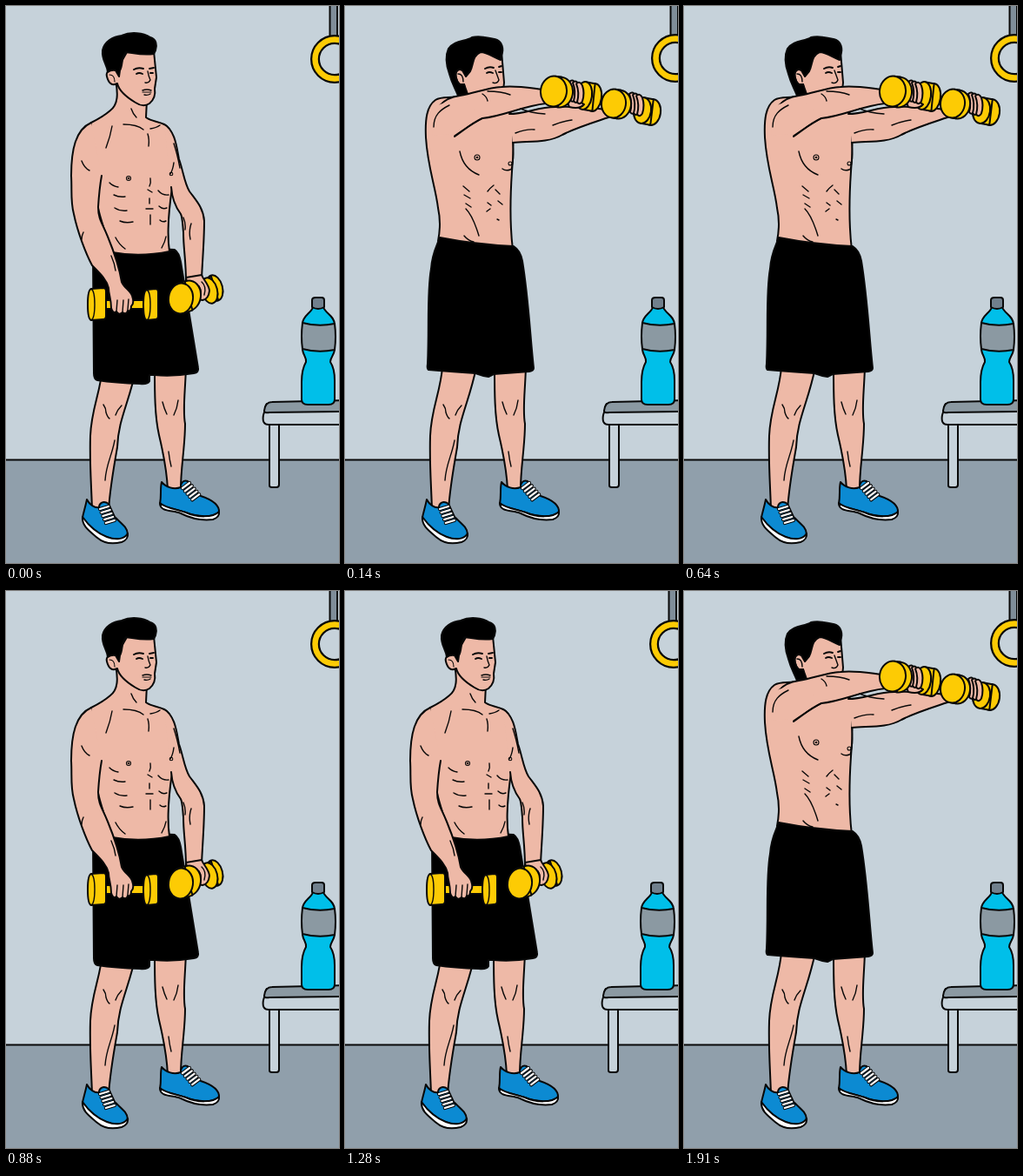
Recreate the animation shown at these times as an HTML page. Size 383x640 px, loop 2.05 s.

```html
<!DOCTYPE html>
<html lang="en">
<head>
<meta charset="utf-8">
<title>Dumbbell front raise</title>
<style>
html, body { margin: 0; height: 100%; overflow: hidden; background: #c6d2da; }
svg { display: block; width: 100vw; height: 100vh; stroke: #080808; stroke-width: 2; stroke-linejoin: round; stroke-linecap: round; }
.skin { fill: #eeb9a7; }
.ink { fill: #000; }
.blue { fill: #0c8ad2; }
.cyan { fill: #00bfe9; }
.gray { fill: #8b99a2; }
.pale { fill: #c6d2da; }
.gold { fill: #fdcb04; }
.white { fill: #fff; }
.line { fill: none; stroke-width: 1.4; }
.fine { fill: none; stroke-width: 1.1; }
</style>
</head>
<body>
<svg viewBox="0 0 383 640" preserveAspectRatio="none">
  <path fill="#c6d2da" stroke="none" d="M0 0H383V522H0z"/>
  <path fill="#909fab" stroke="none" d="M0 521H383V640H0z"/>
  <path d="M0 521.5H383"/>

  <g id="ring">
    <path fill="#7f8d99" d="M372.500 -3V36H381V-3z"/>
    <circle cx="378" cy="61" r="22.500" fill="none" stroke-width="11"/>
    <circle cx="378" cy="61" r="22.500" fill="none" stroke="#fdcb04" stroke-width="6.500"/>
  </g>

  <g id="room">
    <path class="pale" d="M303 480V551Q303 553 306 553H311Q314 553 314 550V480z"/>
    <path class="pale" d="M300 457L296 470Q294 481 302 481H392V457z"/>
    <path class="gray" d="M297 465Q298 455 306 455L392 453V466L303 467Q297 468 297 465z"/>
    <path class="cyan" d="M353 346C351 353 341 356 341 365V395C342 402 346 404 345 409C341 416 340 423 340 432V452Q340 458 347 458H371Q378 458 378 452V430C378 421 377 415 373 409C373 404 377 402 378 395V366C378 356 367 353 365 346z"/>
    <path class="gray" d="M341 364Q359 369 378 365Q380 380 378 395Q359 399 341 394Q339 380 341 364z"/>
    <path fill="#71808d" d="M352 338Q352 335 356 335H363Q366 335 366 338V346Q359 350 352 346z"/>

    <path class="skin" d="M111 415C109 443 98 463 97 494C96 525 98 547 99 578L118 580C119 560 123 535 128 507C129 475 142 455 150 415z"/>
    <path class="skin" d="M171 415C171 444 171 471 176 493C181 514 185 532 186 556L201 555C201 530 206 506 206 480C203 464 206 446 207 415z"/>
    <path class="line" d="M125 499C122 516 115 527 114 545M112 458Q115 462 115 467Q117 473 119 474M133 459Q128 464 126 470M180 455Q182 463 185 469M198 453Q197 462 193 470M187 512Q188 521 190 529"/>

    <path class="blue" d="M93 567C96 573 102 577 107 576C107 571 112 568 118 572L125 587C132 594 140 599 140 607C137 614 125 614 115 610C105 605 95 597 88 588C89 582 91 577 93 567z"/>
    <path class="white" d="M88 587C95 597 105 606 116 610C126 614 136 613 140 606Q141 613 133 616C121 619 112 617 105 611C97 604 87 598 88 587z"/>
    <path class="blue" d="M179 547C184 553 193 556 201 553C201 548 204 544 209 546C213 552 218 558 224 563C236 567 246 573 245 582C238 588 220 587 207 582C195 578 184 577 177 572C179 562 177 555 179 547z"/>
    <path class="white" d="M177 571C184 577 195 578 207 582C220 588 238 588 245 581Q246 587 238 590C222 592 211 588 201 583C192 579 177 582 177 571z"/>
    <g id="laces"></g>
  </g>

  <g id="low">
    <path class="ink" d="M100 285Q140 276 194 280Q199 283 201 294L221 416Q222 421 216 422Q192 426 171 424L165 424V431Q163 435 154 434Q126 433 105 430Q101 429 101 422z"/>
    <path class="skin" d="M126 85C129 101 129 113 120 120C112 127 104 131 98 134L88 180L105 228C110 252 118 270 122 283Q154 289 188 282C185 262 187 236 191 209L194 175C196 155 190 140 182 136C174 132 168 133 161 128L162 108z"/>
    <path class="skin" d="M182 136C194 143 196 160 199 176C204 190 205 203 211 213C219 224 227 232 228 247C228 270 226 290 225 314L207 318C207 290 204 280 204 260C203 250 203 243 201 239C195 231 191 222 190 208"/>
    <path class="line" d="M193 158Q197 170 200 186M193 180Q192 188 189 193M204 243Q207 250 206 257M213 250Q210 259 212 268"/>
    <path class="line" d="M135 136Q151 136 158 142M166 141Q173 140 177 137M163 147Q165 153 164 161M144 118Q146 124 150 128M122 138Q120 150 115 163M119 203Q123 207 129 208M166 198Q167 203 165 207"/>
    <path class="line" d="M124 217Q130 220 137 219M125 232Q131 236 139 235M131 247Q138 250 146 248M163 211L168 214M165 221V227M161 233H169M166 240V251M175 212Q180 218 187 217M176 230Q180 234 185 232M177 246Q180 249 184 247M179 278Q183 271 184 265M126 266Q130 274 137 279"/>
    <g class="fine"><circle cx="141" cy="198" r="2.500"/><circle cx="141" cy="198" r=".7"/><circle cx="190" cy="193" r="1.800"/></g>

    <path class="skin" d="M128 72C123 73 114 73 116 81C118 89 122 92 128 89C130 98 139 105 149 111Q158 117 165 112C171 107 172 101 171 95L173 82L170 52L142 48z"/>
    <path class="ink" d="M117 76C116 66 110 63 111 51C113 41 123 35 133 34C144 29 158 31 166 36C173 38 174 45 172 51L170 55C157 57 147 54 138 53C132 59 135 67 131 74L130 81L126 74Q121 73 117 76z"/>
    <path class="line" d="M163 75Q164 81 166 85Q164 89 160 88M157 97Q162 95 167 97M159 102Q163 103 166 101"/>
    <path stroke-width="1.900" fill="none" d="M147 73Q152 70 158 72M165 72L170 71M150 78Q153 76 157 78M166 77H169"/>
    <path class="fine" d="M119 79Q125 79 125 87M157 99H167"/>

    <g id="lowGear"></g>
    <path class="skin" d="M98 134C80 142 75 165 75 195C76 212 74 225 78 239C82 259 92 285 99 298C110 309 116 315 118 324C118 332 121 336 121 347Q123 354 127 351Q130 356 134 352Q139 355 140 350Q144 351 144 345Q148 342 145 333C143 327 136 324 133 317C130 298 124 282 117 265C111 250 106 245 106 231C107 215 108 206 110 195"/>
    <path class="line" d="M127 351L128 338M134 352L135 338M140 349L141 337M87 178Q90 186 96 189M89 260Q87 264 87 268M121 287Q125 296 126 304"/>
  </g>

  <g id="high">
    <path class="skin" d="M132 103C124 107 112 103 104 108C94 115 92 130 93 151C95 185 104 207 107 232Q111 250 107 270L193 280C189 248 190 220 192 190Q195 160 192 126L180 100z"/>
    <path class="ink" d="M109 266Q150 274 194 276Q202 281 204 293C211 335 213 380 217 416Q217 419 212 420L171 423L165 426Q158 425 150 422Q120 420 96 418Q94 417 95 411C97 370 94 330 99 302C100 285 105 277 109 266z"/>
    <path class="skin" d="M137 74C129 71 126 76 128 83Q130 92 137 90L140 104L182 97L183 88L180 52L155 48z"/>
    <path class="ink" d="M130 103C126 93 123 89 120 78C116 67 115 58 119 49C126 39 138 41 146 36C158 33 166 38 172 38C181 40 183 49 180 57L179 62C171 59 163 53 156 53C146 57 148 68 144 75L139 81L135 74C129 71 126 76 128 83Q130 92 137 90L141 101z"/>
    <path class="line" d="M173 74L177 85Q175 90 170 88M130 78Q136 78 136 87"/>
    <path stroke-width="1.900" fill="none" d="M161 72Q166 69 171 71M177 70L180 69M163 77Q166 75 170 77M177 76H180"/>
    <path class="skin" d="M189 124C207 124 222 116 242 116Q271 115 301 119L303 128C282 135 265 140 250 148C233 158 211 155 193 157"/>
    <path class="skin" d="M126 150C139 141 145 135 158 129C181 127 204 115 231 112L227 96C211 94 196 91 180 93C163 94 150 100 132 103C111 106 101 119 104 137"/>
    <path stroke="none" class="skin" d="M101 116L132 105L157 127L126 147L100 149z"/>
    <path class="line" d="M102 139C102 125 110 119 120 114M126 149Q137 141 158 129M158 101Q163 104 164 109M164 98Q180 98 190 102M202 118Q213 123 230 124M196 146Q209 141 218 142M239 137Q252 132 261 131"/>
    <path class="line" d="M132 167Q136 187 154 194M181 187Q185 190 190 188M193 158Q195 177 191 188M136 207L143 213M137 217L144 221M139 227L145 231M164 213Q167 209 171 206M173 211L178 216M164 226L168 229M176 224L181 228M163 236L167 233M175 245L177 246M139 233Q147 241 154 264M137 264Q142 270 148 271"/>
    <g class="fine"><circle cx="152" cy="174" r="3"/><circle cx="152" cy="174" r=".8"/><circle cx="190" cy="181" r="2"/></g>
    <g id="highGear"></g>
  </g>
</svg>
<script>
const $ = id => document.getElementById(id);
const path = (cls, d) => `<path class="${cls}" d="${d}"/>`;

// Thick disc: the near face is (x, y), the far face lies at (dx, dy) from it.
function weight(x, y, rx, ry, dx, dy, turn = 0) {
  const oval = (cx, cy) =>
    `<ellipse class="gold" cx="${cx}" cy="${cy}" rx="${rx}" ry="${ry}" transform="rotate(${turn} ${cx} ${cy})"/>`;
  const a = Math.atan2(dy, dx) + Math.PI / 2;
  const px = Math.cos(a) * rx, py = Math.sin(a) * ry;
  const side = `M${x + px} ${y + py}l${dx} ${dy}l${-2 * px} ${-2 * py}l${-dx} ${-dy}`;
  return oval(x + dx, y + dy) + path('gold', side) + oval(x, y);
}

// Weight seen from the side, with a slightly rounded rim on the left.
const drum = (x, y, w, h) =>
  path('gold', `M${x + 4} ${y}L${x + w - 3} ${y - 1}q3 0 3 4v${h - 8}q0 4 -3 4L${x + 4} ${y + h}q-4 -1 -4 -${h / 2}t4 -${h / 2}z`) +
  path('line', `M${x + 4} ${y}q4 2 4 ${h / 2}t-4 ${h / 2}`);

function fingers(x, y, n) {
  let out = '';
  for (let i = 0; i < n; i++) {
    const u = x + i * 4, v = y + i * 1.2;
    out += path('skin', `M${u} ${v}q4 -4 7 2q3 9 0 18q-3 5 -6 1q3 -11 -1 -21z`);
  }
  return out;
}

function laces(x, y, dx, dy, w, h) {
  let out = '';
  for (let i = 0; i < 5; i++) {
    const d = `M${x + dx * i} ${y + dy * i}l${w} ${h}`;
    out += `<path d="${d}" stroke-width="4.2"/><path d="${d}" stroke="#fff" stroke-width="2.2"/>`;
  }
  return out;
}

$('laces').innerHTML = laces(108, 578, 1.7, 4, 10, -3) + laces(203, 554, 2.8, 3.3, 8, -6);

$('lowGear').innerHTML =
  path('gold', 'M113 338H161V348H113z') +
  drum(94, 325, 21, 36) +
  drum(158, 326, 17, 35) +
  weight(234, 327, 9, 15, 6, -3, -15) +
  path('skin', 'M207 312L225 309C227 315 233 319 234 327Q233 337 226 338L211 335z') +
  path('line', 'M225 317Q231 322 228 332M222 322Q226 328 223 336') +
  weight(201, 336, 14, 17.5, 9, -3, 8);

$('highGear').innerHTML =
  weight(342, 120, 10, 15, 11, 2, 8) +
  fingers(327, 101, 3) +
  weight(309, 112, 14, 16.5, 6, 1, 8) +
  weight(275, 103, 9, 16, 11, 2, 8) +
  path('skin', 'M253 103Q264 106 275 113Q270 119 258 116z') +
  fingers(258, 87, 3) +
  weight(240, 98, 15, 17.5, 7, 1, 8);

function draw() {
  const t = performance.now() % 2050;
  const up = t >= 140 && t < 880 || t >= 1680;
  $('low').style.display = up ? 'none' : '';
  $('high').style.display = up ? '' : 'none';
  $('room').setAttribute('transform', `translate(${up ? 1 : 0} 0)`);
  $('ring').setAttribute('transform', `translate(${up ? 2 : 0} ${up ? -1 : 0})`);
  requestAnimationFrame(draw);
}
draw();
</script>
</body>
</html>
```
